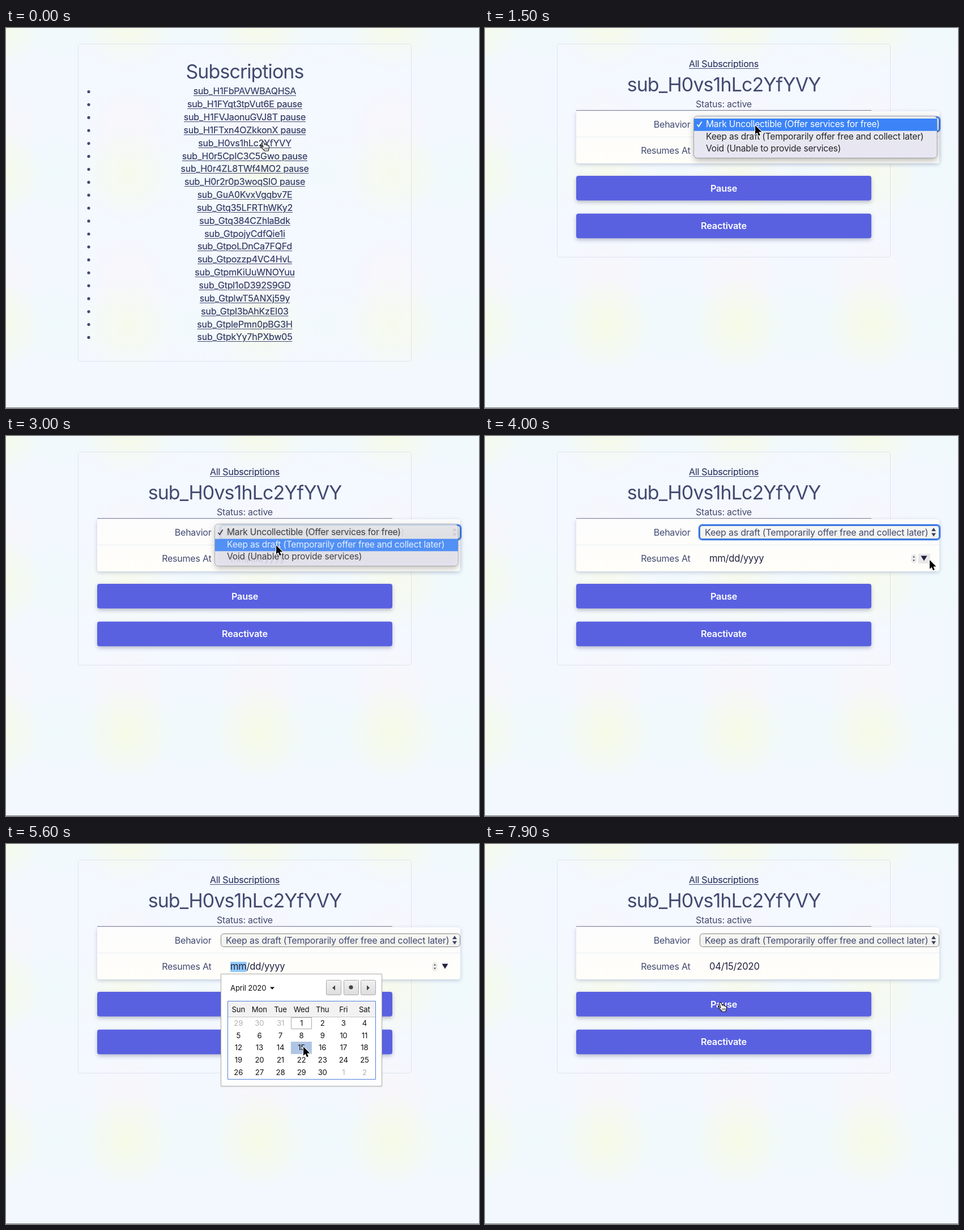
These frames come from a looping animation (835x671 px, 8000 ms). An HTML page with a canvas:

```html
<!DOCTYPE html>
<html lang="en">
<head>
<meta charset="utf-8">
<title>Subscriptions</title>
<style>
html, body { margin: 0; width: 835px; height: 671px; overflow: hidden; background: #f3f8fe; }
canvas { display: block; }
</style>
</head>
<body>
<canvas id="stage" width="835" height="671"></canvas>
<script>
const ctx = document.getElementById('stage').getContext('2d');
const W = 835, H = 671, LOOP = 8000, STEP = 100;
const INK = '#424a70', DARK = '#20213f';
const FONT = 'Inter, "Open Sans", sans-serif';

const OPEN_DETAIL = 400, OPEN_MENU = 1400, FADE_MENU = 2950, CLOSE_MENU = 3300;
const OPEN_CAL = 4300, CLOSE_CAL = 5700, BLUR = 7500;

const SUBS = [
  'H1FbPAVWBAQHSA', 'H1FYqt3tpVut6E pause', 'H1FVJaonuGVJ8T pause',
  'H1FTxn4OZkkonX pause', 'H0vs1hLc2YfYVY', 'H0r5CpIC3C5Gwo pause',
  'H0r4ZL8TWf4MO2 pause', 'H0r2r0p3woqSlO pause', 'GuA0KvxVgqbv7E',
  'Gtq35LFRThWKy2', 'Gtq384CZhlaBdk', 'GtpojyCdfQie1i', 'GtpoLDnCa7FQFd',
  'Gtpozzp4VC4HvL', 'GtpmKiUuWNOYuu', 'Gtpl1oD392S9GD', 'GtplwT5ANXj59y',
  'Gtpl3bAhKzEI03', 'GtplePmn0pBG3H', 'GtpkYy7hPXbw05'
];
const OPTIONS = [
  'Mark Uncollectible (Offer services for free)',
  'Keep as draft (Temporarily offer free and collect later)',
  'Void (Unable to provide services)'
];

// Pointer tip: time, x, y
const PATH = [
  [0, 453, 201], [900, 453, 201], [1300, 477, 172], [1500, 477, 172],
  [1900, 478, 190], [2900, 477, 193], [3300, 477, 193], [3900, 785, 219],
  [4500, 785, 219], [5300, 525, 358], [6300, 525, 358],
  [7300, 415, 280], [8000, 415, 280]
];

const ARROW = new Path2D('M0 0V15.8L3.6 12.4L6.1 18.2L8.8 17L6.3 11.4H11.4Z');
const HAND = new Path2D('M-1 0.8C-1-.5 1.2-.8 2 .6L4 5.6C5-.1 6.5 5.1 6.8 6C7.8 5.2 9 5.5 9.4 6.6' +
  'C10.5 6 11.4 6.9 11.5 8.2L11 12L10 16H3.4C2.6 13.8.8 12.2-2.2 10.6C-4.2 9.5-3-.4-1.4 9.2L1 9.5Z');

function text(str, x, y, { size = 16, color = INK, align = 'left', weight = 400, track = -0.0138 } = {}) {
  ctx.font = `${weight} ${size}px ${FONT}`;
  ctx.letterSpacing = `${(size * track).toFixed(3)}px`;
  ctx.textAlign = align;
  ctx.fillStyle = color;
  ctx.fillText(str, x, y);
}

function link(str, x, y) {
  text(str, x, y, { align: 'center' });
  const w = ctx.measureText(str).width;
  const top = Math.round(y) + 2;
  ctx.save();
  ctx.beginPath();
  ctx.rect(x - w / 2, top, w, 1);
  ctx.clip();
  ctx.fillRect(x - w / 2, top, w, 1);
  // Leave gaps in the underline around descenders
  ctx.strokeStyle = '#f4f8fb';
  ctx.lineWidth = 2.4;
  ctx.lineJoin = 'round';
  ctx.strokeText(str, x, y);
  ctx.restore();
  text(str, x, y, { align: 'center' });
}

function box(x, y, w, h, r, fill, stroke, line = 1) {
  ctx.beginPath();
  ctx.roundRect(x, y, w, h, r);
  if (fill) { ctx.fillStyle = fill; ctx.fill(); }
  if (stroke) { ctx.strokeStyle = stroke; ctx.lineWidth = line; ctx.stroke(); }
}

function shadow(color, blur, dy, draw) {
  ctx.save();
  ctx.shadowColor = color;
  ctx.shadowBlur = blur;
  ctx.shadowOffsetY = dy;
  draw();
  ctx.restore();
}

function poly(color, ...pts) {
  ctx.beginPath();
  for (let i = 0; i < pts.length; i += 2) ctx.lineTo(pts[i], pts[i + 1]);
  ctx.fillStyle = color;
  ctx.fill();
}

function dot(x, y, r, color) {
  ctx.beginPath();
  ctx.arc(x, y, r, 0, Math.PI * 2);
  ctx.fillStyle = color;
  ctx.fill();
}

function vertical(y0, y1, a, b) {
  const g = ctx.createLinearGradient(0, y0, 0, y1);
  g.addColorStop(0, a);
  g.addColorStop(1, b);
  return g;
}

function glow(x, y, r, rgb, alpha) {
  const g = ctx.createRadialGradient(x, y, 0, x, y, r);
  g.addColorStop(0, `rgba(${rgb},${alpha})`);
  g.addColorStop(0.45, `rgba(${rgb},${alpha * 0.6})`);
  g.addColorStop(1, `rgba(${rgb},0)`);
  ctx.fillStyle = g;
  ctx.fillRect(x - r, y - r, 2 * r, 2 * r);
}

function background() {
  ctx.fillStyle = '#f3f8fe';
  ctx.fillRect(0, 0, W, H);
  for (let col = 0; col < 4; col++) {
    for (let row = 0; row < 3; row++) {
      const x = -18 + col * 233, y = -10 + row * 267;
      glow(x + 116, y, 85, '239,250,251', 0.8);
      glow(x, y - 85, 75, '250,245,248', 0.7);
      glow(x, y, 85, '245,251,229', 0.95);
    }
  }
  ctx.fillStyle = '#777c83';
  ctx.fillRect(0, 670, W, 1);
}

function card(bottom) {
  ctx.setLineDash([1, 1]);
  box(127.5, 28.5, 588, bottom - 28.5, 4, 'rgba(246,248,255,.25)', '#c9cfe3');
  ctx.setLineDash([]);
}

function listPage() {
  card(588.5);
  text('Subscriptions', 421.5, 88.8, { size: 34, align: 'center', track: -0.027 });
  SUBS.forEach((id, i) => {
    const y = 117.4 + i * 22.84;
    dot(146, y - 4.9, 2.6, INK);
    link('sub_' + id, 421.5, y);
  });
}

function button(label, y, h) {
  shadow('rgba(60,66,110,.35)', 7, 3, () => box(161, y, 521, h, 4, '#5961e1'));
  text(label, 421.5, y + h / 2 + 6, { size: 16.3, color: '#fff', align: 'center', weight: 600 });
}

function selectBox(label, focused) {
  box(379.5, 158.5, 422, 23, 5, vertical(158, 182, '#f7f7f3', '#f0f0ed'), focused ? null : '#85877f');
  if (focused) {
    box(378.5, 157.5, 424, 25, 5, null, '#3c78e2', 3);
    box(376.5, 155.5, 428, 29, 6, null, 'rgba(90,145,240,.35)', 1);
  }
  text(label, 388, 175.8);
  poly('#3c4160', 788, 168, 792, 162, 796, 168);
  poly('#3c4160', 788, 171.5, 792, 177.5, 796, 171.5);
}

function dateField(value, focused, widgets, hoverArrow) {
  if (focused) {
    ctx.fillStyle = '#92c9f8';
    ctx.fillRect(396, 208, value[0] === 'm' ? 28.5 : 20.5, 18);
  }
  text(value, 396, 222.4, { size: 16.6, color: DARK });
  if (!widgets) return;
  box(753.5, 209.5, 7, 14, 3.5, '#fafafa', '#c9c9c9', 0.8);
  poly('#444', 755, 214.5, 757, 211.5, 759, 214.5);
  poly('#444', 755, 218.5, 757, 221.5, 759, 218.5);
  if (hoverArrow) {
    ctx.fillStyle = '#e8e8e9';
    ctx.fillRect(765, 208, 21, 17);
  }
  poly(DARK, 769.5, 211.5, 780.5, 211.5, 775, 220.5);
}

function detailPage(t, p) {
  card(404.5);
  link('All Subscriptions', 421.5, 68.6);
  text('sub_H0vs1hLc2YfYVY', 421.5, 111.6, { size: 34, align: 'center', track: -0.027 });
  text('Status: active', 421.5, 139.9, { align: 'center' });
  ctx.fillStyle = '#828799';
  ctx.fillRect(161, 145, 521, 1);

  shadow('rgba(70,90,150,.3)', 7, 2, () =>
    box(161, 147, 641, 92, 4, vertical(147, 239, '#fcfcfd', '#fffef9')));
  ctx.fillStyle = '#e7ebf3';
  ctx.fillRect(161, 192, 641, 1);
  text('Behavior', 362.5, 175.8, { align: 'right' });
  text('Resumes At', 362.5, 222.4, { align: 'right' });

  selectBox(OPTIONS[t < CLOSE_MENU ? 0 : 1], t >= OPEN_MENU && t < OPEN_CAL);
  const menuOpen = t >= OPEN_MENU && t < CLOSE_MENU;
  const calOpen = t >= OPEN_CAL && t < CLOSE_CAL;
  const focused = t >= OPEN_CAL && t < BLUR;
  const over = t > 900 && !menuOpen && p.x > 379 && p.x < 802 && p.y > 192 && p.y < 239;
  dateField(t < CLOSE_CAL ? 'mm/dd/yyyy' : '04/15/2020', focused, focused || over,
    over && !calOpen && p.x > 765 && p.x < 787);

  button('Pause', 261, 43.5);
  button('Reactivate', 327.7, 43.5);
  if (menuOpen) menu(t, p);
  if (calOpen) calendar(p);
}

function menu(t, p) {
  const active = Math.max(0, Math.min(2, Math.floor((p.y - 160) / 21.7)));
  ctx.save();
  ctx.globalAlpha = Math.min(1, (CLOSE_MENU - t) / (CLOSE_MENU - FADE_MENU));
  shadow('rgba(0,0,0,.3)', 12, 4, () =>
    box(369, 155.5, 429, 74, 6, vertical(155, 230, '#e6e9ec', '#e8e6f3')));
  box(368.5, 155.5, 429.5, 74, 6, null, 'rgba(80,80,90,.4)');
  ctx.fillStyle = '#3b83f7';
  ctx.fillRect(369, 160 + active * 21.7, 429, 21.7);
  OPTIONS.forEach((label, i) =>
    text(label, 390, 174.8 + i * 21.8, { size: 15.6, color: i === active ? '#fff' : '#262629' }));
  ctx.strokeStyle = active === 0 ? '#fff' : '#262629';
  ctx.lineWidth = 1.8;
  ctx.beginPath();
  ctx.moveTo(374.5, 170.5);
  ctx.lineTo(377.3, 174);
  ctx.lineTo(382.5, 165.5);
  ctx.stroke();
  ctx.restore();
}

function calendar(p) {
  const cw = 37.1, rh = 21.8, left = 391.5, top = 305.5;
  const ink = { size: 13.2, color: '#111', align: 'center' };
  shadow('rgba(0,0,0,.08)', 3, 1, () => box(379.5, 229.5, 284, 198, 0, '#fff', '#b2b2ac'));
  text('April 2020', 396, 259, { ...ink, align: 'left' });
  poly('#111', 466, 252.5, 474, 252.5, 470, 257);
  for (const x of [565.5, 596.5, 626.5]) {
    box(x, 240.5, 26, 26, 2, vertical(240, 267, '#f2f2f2', '#dcdcdc'), '#a9a9ad');
  }
  poly('#444', 581, 249.5, 581, 258.5, 576, 254);
  dot(609, 253, 3.6, '#444');
  poly('#444', 637, 249.5, 637, 258.5, 642, 254);

  ctx.fillStyle = '#f2f2f2';
  ctx.fillRect(392, 278, 260, 27);
  ctx.fillStyle = '#c4c4c4';
  ctx.fillRect(392, 305, 260, 1);
  ['Sun', 'Mon', 'Tue', 'Wed', 'Thu', 'Fri', 'Sat'].forEach((day, i) =>
    text(day, 410.3 + i * cw, 297, ink));

  const hoverCol = Math.floor((p.x - left) / cw), hoverRow = Math.floor((p.y - top) / rh);
  for (let i = 0; i < 35; i++) {
    const col = i % 7, row = Math.floor(i / 7), n = i - 2;
    const x = left + col * cw, y = top + row * rh;
    if (col === hoverCol && row === hoverRow) {
      ctx.fillStyle = '#afc5e5';
      ctx.fillRect(x, y, cw, rh);
    }
    if (n === 1) box(503.5, 306.5, 36, 20, 0, null, '#aaa');
    const inside = n >= 1 && n <= 30;
    const label = n < 1 ? n + 31 : inside ? n : n - 30;
    text(String(label), 410.3 + col * cw, 320.8 + row * rh, { ...ink, color: inside ? '#111' : '#b0b0b0' });
  }
  box(391.5, 277.5, 261, 138, 0, null, '#4f7fd8');
}

function pointerAt(t) {
  const i = PATH.findIndex(k => k[0] > t);
  const [t0, x0, y0] = PATH[i - 1], [t1, x1, y1] = PATH[i];
  const u = (t - t0) / (t1 - t0), e = u * u * (3 - 2 * u);
  return { x: x0 + (x1 - x0) * e, y: y0 + (y1 - y0) * e };
}

function pointer(t, p) {
  const onButton = (p.y >= 261 && p.y <= 305) || (p.y >= 328 && p.y <= 371);
  const hand = t <= 900 || (t >= CLOSE_CAL && onButton);
  ctx.save();
  ctx.translate(p.x, p.y);
  ctx.lineJoin = 'round';
  if (hand) {
    ctx.fillStyle = '#fff';
    ctx.fill(HAND);
    ctx.strokeStyle = '#15151c';
    ctx.lineWidth = 1.15;
    ctx.stroke(HAND);
    ctx.beginPath();
    for (const x of [4, 6.3, 8.6]) {
      ctx.moveTo(x, 10);
      ctx.lineTo(x + 0.2, 13.5);
    }
    ctx.lineWidth = 0.9;
    ctx.stroke();
  } else {
    ctx.strokeStyle = '#fff';
    ctx.lineWidth = 2;
    ctx.stroke(ARROW);
    ctx.fillStyle = '#000';
    ctx.fill(ARROW);
  }
  ctx.restore();
}

function render(now) {
  const t = Math.floor((now % LOOP) / STEP) * STEP;
  const p = pointerAt(t);
  background();
  if (t < OPEN_DETAIL) listPage();
  else detailPage(t, p);
  pointer(t, p);
}

const start = performance.now();
function tick() {
  render(performance.now() - start);
  requestAnimationFrame(tick);
}
tick();
</script>
</body>
</html>
```
